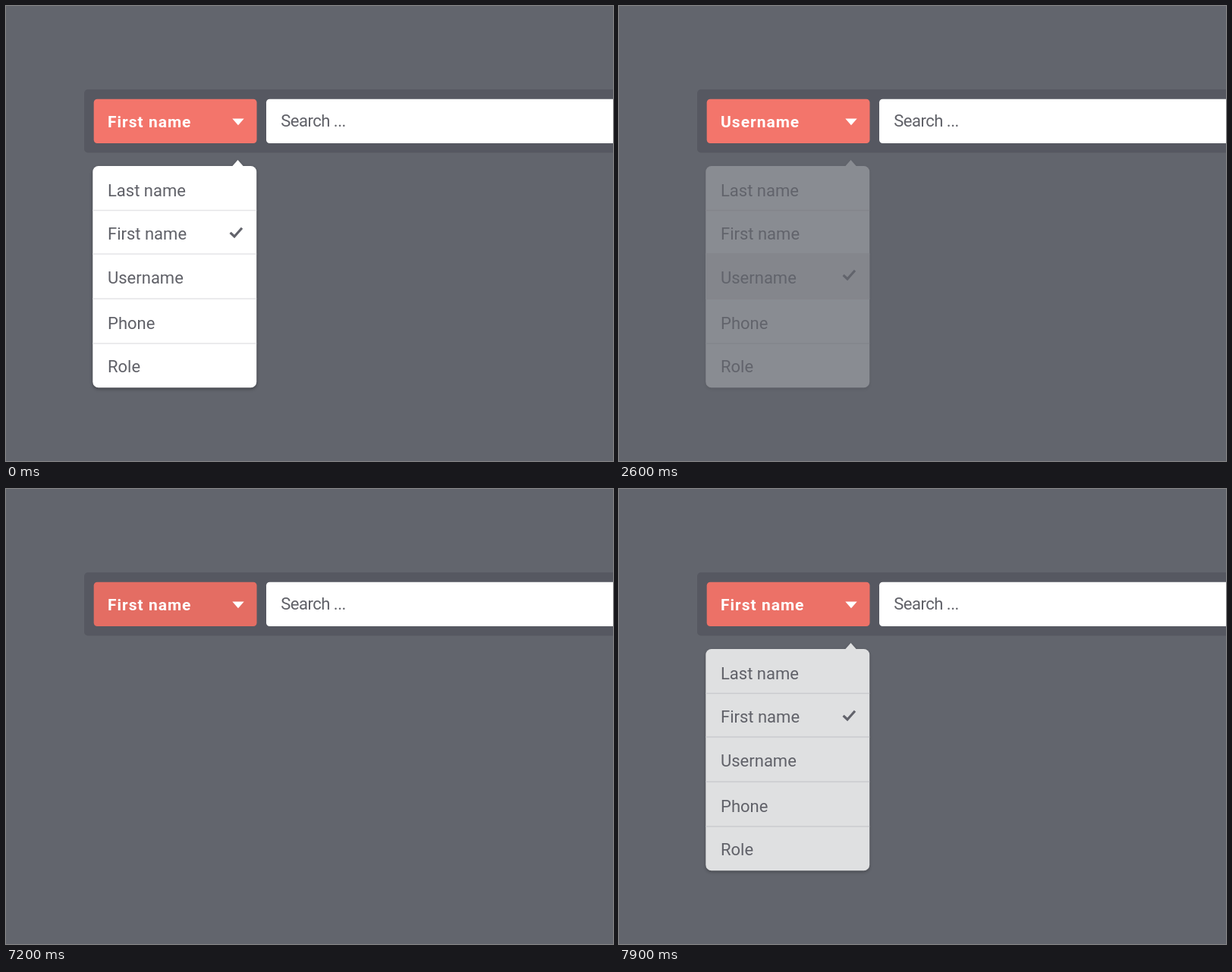
An HTML page that plays this animation: 800x600 px, repeating every 8 s.

```html
<!DOCTYPE html>
<html lang="en">
<head>
<meta charset="utf-8">
<title>Search filter</title>
<style>
  html, body { margin: 0; width: 100%; height: 100%; overflow: hidden; background: #62656d; }
  svg { display: block; width: 100%; height: 100%; }
  text { font: 22px Roboto, sans-serif; fill: #606168; }
  .label { font-size: 21px; font-weight: 700; letter-spacing: 1px; fill: #fff; }
  .hint { letter-spacing: -0.5px; }
  .tick { fill: none; stroke: #62636b; stroke-width: 3.2; }
  #lines { stroke: #e5e5e7; stroke-width: 1.5; }
  #menu { filter: drop-shadow(0 2px 2px rgba(0, 0, 0, .32)); }
</style>
</head>
<body>
<svg viewBox="0 0 800 600">
  <rect x="103" y="110" width="720" height="83.5" rx="5" fill="#565861"/>
  <rect id="button" x="115.7" y="122.8" width="214.8" height="58.2" rx="4.5"/>
  <text class="label" id="first" x="134" y="160">First name</text>
  <text class="label" id="user" x="134" y="160">Username</text>
  <path d="M298.3 148.5h15.4l-7.7 8.8z" fill="#fff"/>
  <rect x="343" y="122.8" width="480" height="58.2" rx="4.5" fill="#fff"/>
  <text class="hint" x="362.3" y="159">Search ...</text>

  <g id="menu">
    <path d="M298 211.5l7.5-8.5 7.5 8.5z" fill="#fff"/>
    <rect x="114.3" y="211" width="215.9" height="292.3" rx="7.5" fill="#fff"/>
    <g id="lines"></g>
    <rect id="hover" x="114.3" y="326.5" width="215.9" height="60" fill="#e9e9ea"/>
    <g id="items"></g>
    <path class="tick" id="tickFirst" d="M295.6 298.8l5.4 5.2 10-11.2"/>
    <path class="tick" id="tickUser" d="M295.6 354.8l5.4 5.2 10-11.2"/>
  </g>
</svg>
<script>
  const LOOP = 8000, STEP = 100;
  const ITEMS = [["Last name", 251], ["First name", 308], ["Username", 365.5], ["Phone", 426], ["Role", 483]];
  const LINES = [269.4, 327, 386, 445];
  const REST = [243, 117, 107], PRESSED = [206, 96, 88];

  const get = id => document.getElementById(id);
  const fade = (id, value) => get(id).setAttribute("opacity", value);
  const clamp = v => Math.min(1, Math.max(0, v));

  // Progress that reaches its first part at the start time and 1 after the given steps.
  const ramp = (t, start, steps) => clamp((t - start + STEP) / (steps * STEP));

  get("items").innerHTML = ITEMS.map(([name, y]) => `<text x="134" y="${y}">${name}</text>`).join("");
  get("lines").innerHTML = LINES.map(y => `<path d="M114.3 ${y}h215.9"/>`).join("");

  function draw(now) {
    const t = Math.floor(now % LOOP / STEP) * STEP;

    const toUser = ramp(t, 1000, 5), toFirst = ramp(t, 5700, 4);
    const user = toUser * (1 - toFirst);
    fade("user", user);
    fade("first", 1 - user);
    fade("tickUser", user);
    fade("tickFirst", 1 - user);

    const open = t < 7000 ? 1 - ramp(t, 2400, 4) : ramp(t, 7600, 5);
    fade("menu", open);
    fade("hover", t >= 2400 && t < 2700 ? 1 : 0);

    const press = t < 7200 ? 0 : 1 - Math.abs(t - 7500) / 500;
    const tone = REST.map((c, i) => Math.round(c + (PRESSED[i] - c) * press));
    get("button").setAttribute("fill", `rgb(${tone})`);
  }

  const start = performance.now();
  function tick() {
    draw(performance.now() - start);
    requestAnimationFrame(tick);
  }
  tick();
</script>
</body>
</html>
```
